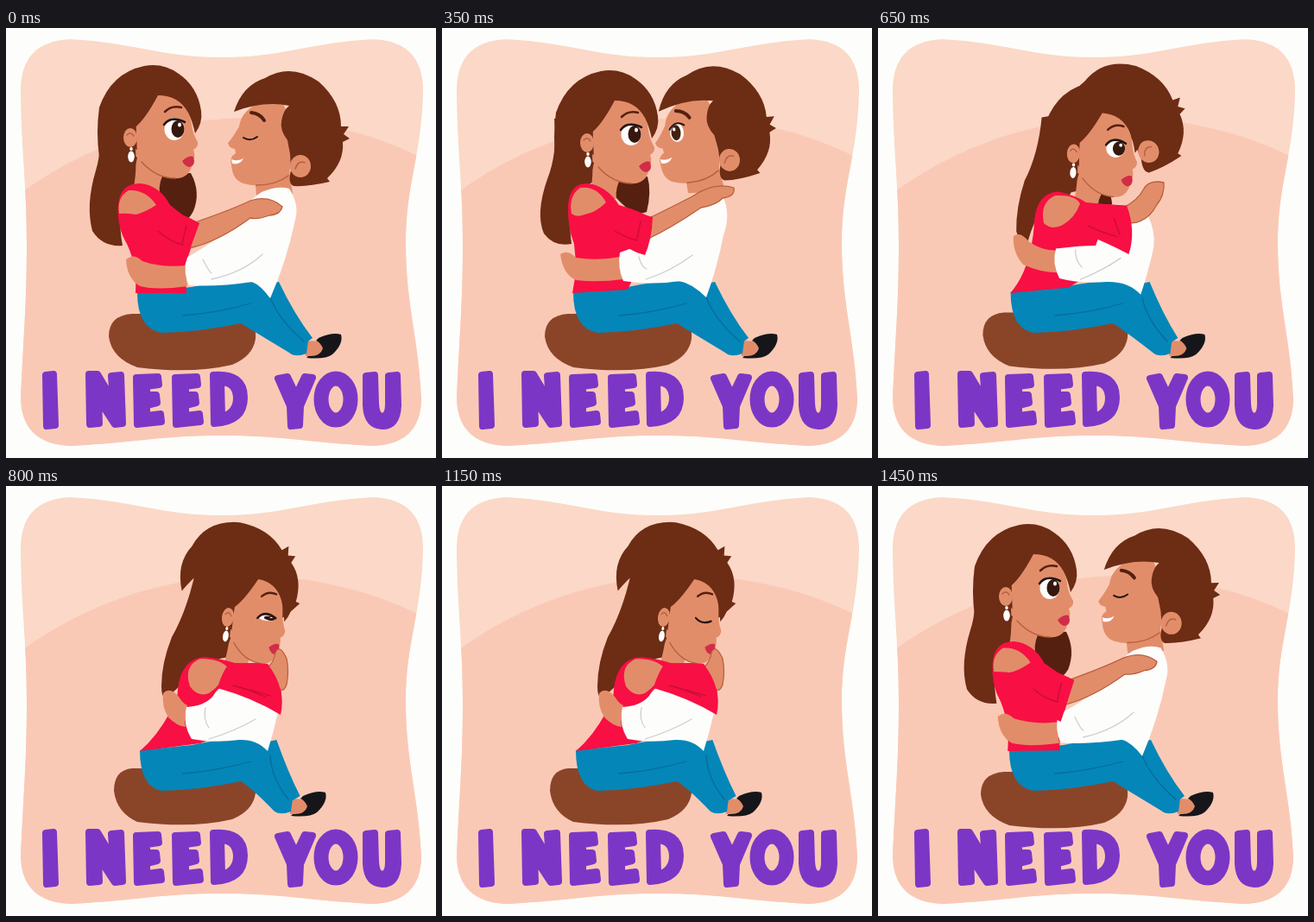
An HTML page with a canvas that plays this animation: 498 px wide and 498 px high, repeating every 1500 ms.

```html
<!DOCTYPE html>
<html lang="en">
<head>
<meta charset="utf-8">
<title>I need you</title>
<style>
html, body { margin: 0; width: 100%; height: 100%; overflow: hidden; background: #fdfefb; }
canvas { display: block; width: 100vw; height: 100vh; }
</style>
</head>
<body>
<canvas id="stage" width="498" height="498" role="img" aria-label="I NEED YOU"></canvas>
<script>
const ctx = document.getElementById('stage').getContext('2d');
const LOOP = 1500, STEP = 50;
const C = {
  hair: '#6d2c14', hairDark: '#55200f', cushion: '#8a4529', skin: '#e28d6a', skinLine: '#b9603f',
  red: '#f80f43', redLine: '#c80d38', blue: '#0486b8', blueLine: '#066c99',
  white: '#fdfdfc', crease: '#cfcfd4', ink: '#211512', purple: '#7c36c6'
};

const lerp = (a, b, u) => a + (b - a) * u;
const smooth = u => u * u * (3 - 2 * u);

// [time, value, easing to the next key]. Hug: 0 apart, 1 close, 2 embracing, 3 tight hug.
const HUG = [[0, 0], [200, -.25], [350, 1], [550, 2], [800, 3], [1150, 3, smooth], [1500, 0]];
const HER_LID = [[0, 0], [600, 0], [800, .75], [900, 1], [1150, 1], [1300, 0], [1500, 0]];
const HIS_EYE = [[0, 0], [150, 0], [200, .25], [300, 1], [1300, 1], [1400, 0], [1500, 0]];

// Each body part has one outline per hug stage.
const PARTS = {
  backHair: [
    'M108 95 Q112 140 104 165 Q92 205 100 235 Q112 254 135 252 Q128 215 140 190 L165 165 L170 90Z',
    'M130 105 Q134 145 122 175 Q108 215 118 238 Q130 254 150 250 Q145 215 156 190 L188 170 L195 95Z',
    'M168 115 Q168 150 155 178 Q146 210 147 238 Q152 250 166 250 Q165 215 180 190 L225 180 L235 105Z',
    'M222 86 Q212 140 192 175 Q180 205 180 232 Q180 244 184 245 Q203 235 220 205 L258 198 L300 72Z'],
  innerHair: [
    'M165 170 L214 168 Q226 190 217 212 Q211 224 203 225 Q185 200 165 185Z',
    'M190 178 L238 172 Q243 190 237 213 Q230 216 222 214 Q200 200 190 178Z',
    'M228 185 L270 188 Q272 200 268 207 Q262 210 255 208 Q240 200 228 185Z',
    'M255 180 L262 178 Q268 190 276 200 Q270 205 262 206 Q258 195 255 180Z'],
  blouse: [
    'M130 205 Q132 180 155 180 Q178 182 190 205 Q215 225 222 228 Q215 255 207 275 L209 307 L150 307 Q152 275 140 250 Q128 230 130 205Z',
    'M146 205 Q148 180 168 180 Q190 182 205 205 Q230 212 242 220 Q240 245 237 258 L215 303 L151 307 Q157 280 153 250 Q145 230 146 205Z',
    'M169 215 Q172 185 195 184 Q215 190 225 200 Q260 205 278 206 Q280 235 272 256 L218 302 L152 307 Q168 285 168 250 Q168 235 169 215Z',
    'M199 235 Q203 200 230 198 Q250 200 265 205 Q300 205 312 210 Q322 235 318 260 L225 298 L155 307 Q175 290 190 262 Q199 250 199 235Z'],
  shoulder: [
    'M131 215 Q128 196 142 188 Q162 187 174 205 Q160 214 150 216 Q138 214 131 215Z',
    'M150 215 Q146 195 160 185 Q180 183 190 202 Q178 214 165 216 Q156 220 150 215Z',
    'M178 222 Q175 198 192 190 Q215 188 218 198 Q215 212 200 220 Q188 228 178 222Z',
    'M213 232 Q205 208 225 200 Q250 200 258 212 Q248 232 235 240 Q222 245 213 232Z'],
  hisHand: [
    'M139 268 Q148 260 158 270 Q180 278 210 275 Q208 285 210 299 Q175 304 155 299 Q140 290 139 268Z',
    'M137 262 Q146 256 155 266 Q180 270 206 265 Q204 280 210 291 Q180 295 155 292 Q140 285 137 262Z',
    'M140 242 Q148 236 158 250 Q180 262 203 260 Q203 275 206 286 Q180 286 155 278 Q140 265 140 242Z',
    'M182 240 Q190 232 200 244 Q205 252 210 254 Q205 268 208 279 Q198 278 188 268 Q180 255 182 240Z'],
  shirt: [
    'M296 190 Q315 182 328 186 Q340 205 335 222 Q325 270 306 313 Q295 298 285 294 Q245 300 212 298 Q205 285 209 266 Q255 240 262 225 Q280 200 296 190Z',
    'M292 195 Q310 186 325 195 Q335 215 326 240 Q318 280 306 312 Q290 296 275 293 Q245 298 210 293 Q203 278 206 260 Q240 248 245 240 Q270 210 292 195Z',
    'M285 185 Q312 182 322 200 Q328 225 322 250 Q314 285 305 310 Q290 293 260 294 Q230 295 207 288 Q199 272 204 255 Q240 250 260 258 Q275 215 285 185Z',
    'M250 232 Q285 240 300 247 Q312 252 315 262 Q310 285 303 307 Q290 293 270 294 Q240 298 215 293 Q204 275 209 256 Q230 255 240 243 Q244 236 250 232Z'],
  shirtFold: [
    'M228 268 Q235 282 238 284 M238 291 Q275 283 297 262',
    'M228 265 Q231 277 237 279 M236 291 Q265 282 290 263',
    'M227 257 Q229 270 237 275 M234 290 Q260 277 276 264',
    'M231 257 Q228 270 235 280 M235 293 Q265 284 289 270'],
  forearm: [
    'M216 226 Q260 211 283 200 Q305 193 320 207 Q318 216 305 217 Q292 222 283 220 Q245 248 212 255Z',
    'M236 222 Q265 208 290 195 Q315 178 338 185 Q340 195 325 197 Q318 205 300 208 Q265 232 237 245Z',
    'M274 205 Q295 195 303 185 Q310 170 335 165 Q335 180 320 190 Q312 205 295 215 Q285 228 275 232Z',
    'M302 211 Q310 205 312 193 Q317 182 325 200 Q328 215 325 230 Q322 238 318 236 Q310 228 302 211Z'],
  sleeve: [
    'M172 207 Q200 212 224 226 Q215 250 207 275 Q185 265 172 240 Q165 220 172 207Z',
    'M190 205 Q220 212 244 219 Q243 245 235 263 Q215 258 205 245 Q192 225 190 205Z',
    'M220 200 Q255 203 278 205 Q282 235 272 260 Q250 250 235 242 Q222 225 220 200Z',
    'M255 210 Q275 203 303 206 Q325 235 318 265 Q285 245 245 234 Q248 222 255 210Z'],
  sleeveFold: [
    'M176 235 Q190 248 205 251 M209 229 L204 249',
    'M200 235 Q213 243 226 246 M230 224 L226 244',
    'M230 228 Q244 238 262 240 M267 211 L263 237',
    'M263 231 Q280 235 300 244 M283 236 L306 243']
};
// Ear x, ear y, turn in degrees, width.
const HER_HEAD = [[144, 127, 0, 1], [168, 133, 0, 1], [206, 141, 0, 1], [257, 152, 9, .87]];
const HIS_HEAD = [[340, 160, 0, 1], [332, 153, -5, 1], [320, 147, -14, 1], [301, 138, -30, 1]];
const FOOT = [0, 0, -4, -18];

function track(keys, t) {
  let i = 0;
  while (i < keys.length - 2 && t >= keys[i + 1][0]) i++;
  const [t0, a, ease = u => u] = keys[i];
  const [t1, b] = keys[i + 1];
  return lerp(a, b, ease((t - t0) / (t1 - t0)));
}

function segment(list, s) {
  const i = Math.min(2, Math.max(0, Math.floor(s)));
  return [list[i], list[i + 1], s - i];
}

function morph(list, s) {
  const [a, b, u] = segment(list, s);
  const to = b.match(/\d+/g);
  let n = 0;
  return a.replace(/\d+/g, v => lerp(+v, +to[n++], u).toFixed(2));
}

function fill(d, color) {
  ctx.fillStyle = color;
  ctx.fill(new Path2D(d), 'evenodd');
}

function line(d, color, width) {
  ctx.strokeStyle = color;
  ctx.lineWidth = width;
  ctx.stroke(new Path2D(d));
}

function oval(x, y, rx, ry, color) {
  ctx.fillStyle = color;
  ctx.beginPath();
  ctx.ellipse(x, y, rx, ry, 0, 0, Math.PI * 2);
  ctx.fill();
}

// Heads are drawn in the resting pose and pivot at the ear.
function withHead(poses, s, draw) {
  const [a, b, u] = segment(poses, s);
  const [x, y, turn, width] = a.map((v, i) => lerp(v, b[i], u));
  ctx.save();
  ctx.translate(x, y);
  ctx.rotate(turn * Math.PI / 180);
  ctx.scale(width, 1);
  ctx.translate(-poses[0][0], -poses[0][1]);
  draw();
  ctx.restore();
}

function squashed(y, amount, draw) {
  ctx.save();
  ctx.translate(0, y);
  ctx.scale(1, amount);
  ctx.translate(0, -y);
  draw();
  ctx.restore();
}

function drawCard() {
  ctx.fillStyle = '#fdfefb';
  ctx.fillRect(0, 0, 498, 498);
  const card = new Path2D('M17 75 Q16 15 75 13 C150 17 180 34 250 34 C320 34 350 17 425 13 Q484 15 483 75 ' +
    'C481 150 463 180 463 250 C463 320 478 360 481 430 Q480 482 425 484 C350 480 320 472 250 472 ' +
    'C180 472 150 480 75 484 Q19 482 17 430 C20 360 24 320 24 250 C24 180 18 150 17 75Z');
  ctx.fillStyle = '#fbd8c7';
  ctx.fill(card);
  ctx.save();
  ctx.clip(card);
  oval(283, 553, 449, 449, '#fac9b6');
  ctx.restore();
}

function drawLettering() {
  const E = 'M151 405 L176 404 L177 413 L163 415 L163 425 L174 425 L175 434 L163 437 L163 449 L179 447 L180 456 L152 459Z';
  const put = (d, dx = 0) => {
    ctx.save();
    ctx.translate(dx, 0);
    fill(d, C.purple);
    line(d, C.purple, 8);
    ctx.restore();
  };
  put('M46 402 L55 401 L57 460 L47 461Z');
  put('M96 401 L106 401 L124 431 L122 403 L133 402 L135 458 L126 459 L107 430 L108 458 L97 459Z');
  put(E);
  put(E, 45);
  put('M240 402 Q276 399 276 428 Q276 456 241 458Z M249 410 L250 450 Q267 446 267 428 Q266 410 249 410Z');
  put('M315 406 L326 404 L336 425 L346 404 L355 405 L341 438 L340 460 L330 461 L329 438Z');
  put('M417 403 L427 402 L428 435 Q429 450 436 450 Q443 449 443 435 L443 403 L453 402 L454 437 Q453 461 436 461 Q418 460 417 437Z');
  line('M365 430 A17 24 0 1 1 399 430 A17 24 0 1 1 365 430Z', C.purple, 17);
}

function drawCushion(s) {
  const shift = Math.max(0, s - 2);
  const x = 119 + 6 * shift;
  ctx.save();
  ctx.translate(0, -4 * shift);
  fill(`M${x} 357 Q${x} 333 146 331 L272 331 Q291 340 289 360 Q286 380 262 390 Q215 401 152 393 Q${x + 3} 382 ${x} 357Z`, C.cushion);
  ctx.restore();
}

function drawLegs(s) {
  const [a, b, u] = segment(FOOT, s);
  const f = lerp(a, b, u);
  const hip = 152 - f / 6;
  fill(`M${346 + f} 362 L${368 + f} 363 L${370 + f} 381 L${347 + f} 380Z`, C.skin);
  fill(`M${362 + f} 359 Q${378 + f} 352 ${388 + f} 355 Q${391 + f} 366 ${378 + f} 378 Q${370 + f} 384 ${348 + f} 382 L${350 + f} 380 Q${364 + f} 381 ${367 + f} 371 Q${364 + f} 364 ${359 + f} 362Z`, '#16161a');
  fill(`M285 300 L${316 + f * .15} 294 Q${334 + f * .4} 332 ${355 + f * .8} 359 L${340 + f} 370Z`, C.blue);
  fill(`M${hip} 306 L215 300 Q262 290 290 295 Q312 304 ${322 + f / 2} 330 L${350 + f} 362 L${348 + f} 377 Q${335 + f} 382 ${328 + f} 376 Q285 350 272 342 Q225 352 180 353 Q${hip} 348 ${hip} 306Z`, C.blue);
  line(`M205 333 Q245 330 283 319 M306 312 Q${316 + f / 2} 338 ${345 + f} 363`, C.blueLine, 1.3);
}

function drawHisFace(eye) {
  fill('M288 172 L328 165 L332 192 Q312 196 290 194Z', C.skin);
  fill('M290 88 Q272 98 270 114 Q262 128 257 133 Q258 139 265 140 L266 145 Q258 150 261 158 Q262 176 275 180 Q300 188 328 170 L335 120 L320 85Z', C.skin);
  line('M290 182 Q313 182 327 171', C.skinLine, 1.5);
  line('M284 98 Q294 99 299 107', C.hairDark, 4);
  if (eye > .1) {
    squashed(128, eye, () => {
      oval(283, 123, 8, 11, C.white);
      oval(282, 123, 5.5, 9, '#42200f');
      oval(280, 119, 1.8, 2.2, C.white);
      line('M275 119 Q282 108 292 115', C.ink, 2);
    });
  } else line('M275 127 Q283 132 291 126', C.ink, 2);
  fill('M261 152 Q268 155 275 151 Q271 159 262 157Z', C.white);
}

function drawHisHair() {
  fill('M264 97 Q274 66 300 58 Q330 40 362 62 Q388 85 388 114 L397 114 L391 123 L398 128 L390 132 Q392 155 372 174 L375 178 Q350 184 333 183 Q326 180 330 165 L329 146 L326 130 Q317 118 319 108 Q321 95 328 90 Q298 84 264 97Z', C.hair);
  oval(341, 160, 12, 13, C.skin);
  line('M335 163 Q338 153 346 156', C.skinLine, 1.5);
}

function drawHerHead(lid) {
  fill('M150 140 L185 165 Q176 178 178 192 L145 195 Q152 175 150 140Z', C.skin);
  fill('M150 95 Q165 75 185 78 Q212 85 215 112 Q216 122 222 132 Q223 138 217 141 Q220 148 216 155 Q214 172 200 174 Q172 176 152 150Z', C.skin);
  line('M157 155 Q174 174 196 174', C.skinLine, 1.5);
  fill('M219 122 Q228 110 226 96 Q222 68 200 53 Q182 40 160 44 Q122 52 108 92 Q104 120 108 150 L122 200 Q148 175 152 150 L136 140 Q134 118 148 116 Q160 108 176 78 Q200 78 211 98 Q216 108 219 122Z', C.hair);
  oval(144, 127, 8, 11, C.skin);
  line('M140 124 Q144 119 148 125', C.skinLine, 1.5);
  oval(145, 149, 3.8, 6.5, C.white);
  oval(145, 140, 1.8, 2, C.white);
  line('M184 97 Q192 89 203 92', C.hairDark, 2.5);
  if (lid < .9) {
    squashed(122, 1 - lid, () => {
      oval(195, 117, 11.5, 13, C.white);
      oval(199, 117, 7.5, 10, '#35170e');
      oval(201, 112, 2, 2.5, C.white);
    });
    const y = lid * 14;
    line(`M183 ${112 + y} Q191 ${101 + y} 207 ${109 + y}`, C.ink, 2.6);
  } else line('M186 122 Q195 129 207 123', C.ink, 2.2);
  fill('M204 154 Q212 147 217 149 L218 154 Q218 160 212 161 Q207 160 204 154Z', '#d22c48');
}

function draw(time) {
  const s = track(HUG, time);
  const part = (name, color) => fill(morph(PARTS[name], s), color);
  const folds = (name, color) => line(morph(PARTS[name], s), color, 1.3);
  ctx.lineCap = ctx.lineJoin = 'round';
  drawCard();
  drawLettering();
  drawCushion(s);
  withHead(HIS_HEAD, s, () => {
    // In the tight hug his face is buried behind her hair.
    if (s < 2.4) drawHisFace(track(HIS_EYE, time));
    drawHisHair();
  });
  part('innerHair', C.hairDark);
  part('backHair', C.hair);
  drawLegs(s);
  withHead(HER_HEAD, s, () => drawHerHead(track(HER_LID, time)));
  part('blouse', C.red);
  part('shoulder', C.skin);
  part('hisHand', C.skin);
  part('shirt', C.white);
  folds('shirtFold', C.crease);
  part('forearm', C.skin);
  folds('forearm', C.skinLine);
  part('sleeve', C.red);
  folds('sleeveFold', C.redLine);
}

function tick() {
  const t = performance.now() % LOOP;
  draw(Math.floor(t / STEP) * STEP);
  requestAnimationFrame(tick);
}
tick();
</script>
</body>
</html>
```
